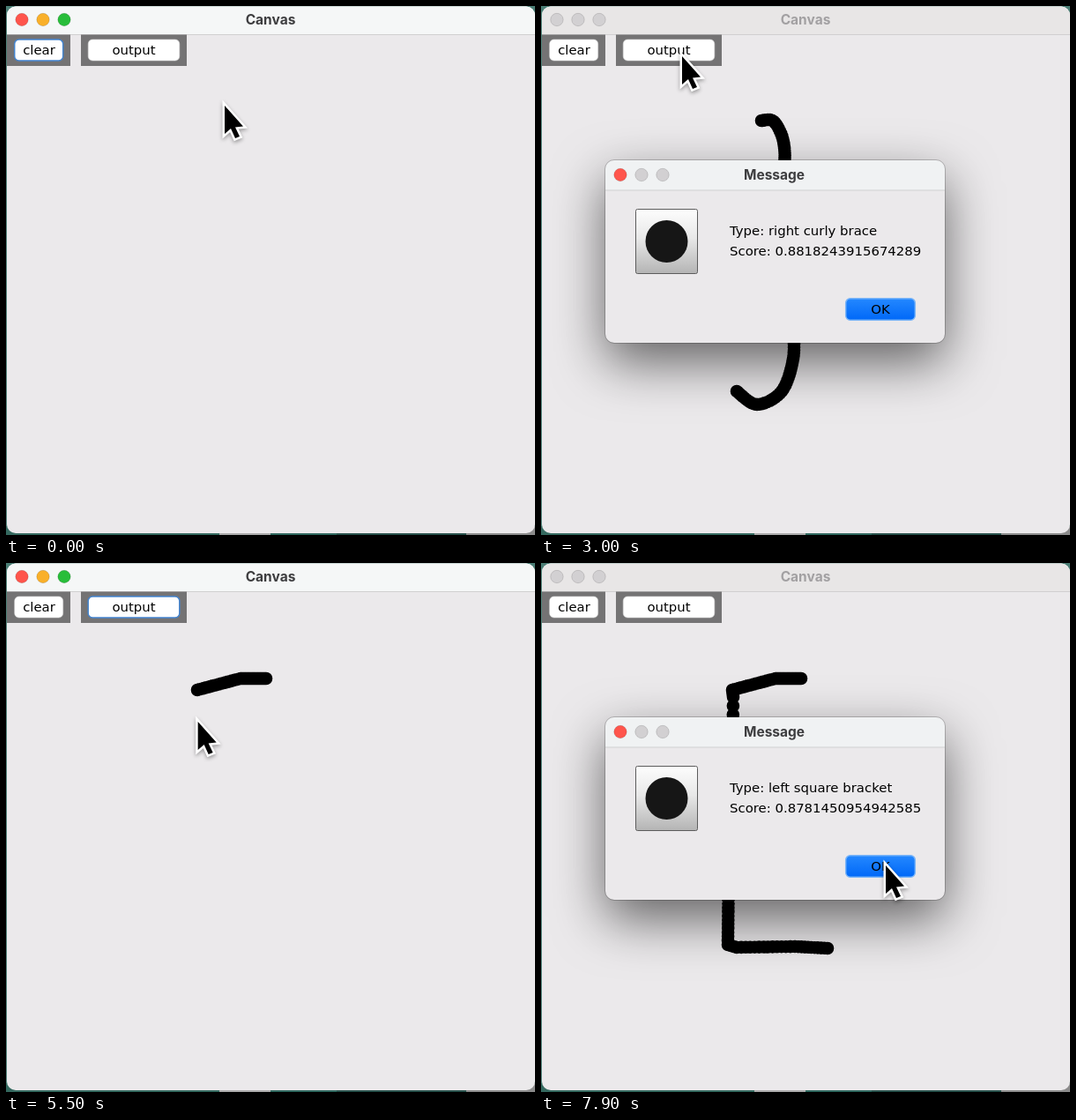
Write an HTML page that moves like this. It is 600 by 600 pixels and loops after 8 s.

```html
<!DOCTYPE html>
<html lang="en">
<head>
<meta charset="utf-8">
<title>Canvas</title>
<style>
  html, body { margin: 0; width: 100%; height: 100%; overflow: hidden; background: #4a7d74; }
  svg { display: block; width: 100vw; height: 100vh; }
  text { text-anchor: middle; font: 14.9px "DejaVu Sans", sans-serif; fill: #000; }
  .title { font: 700 15.5px Inter, sans-serif; fill: #3d3d3f; }
  .note { text-anchor: start; }
  .light { stroke: #0002; stroke-width: 1; }
  .off { fill: #d2d0d2; }
  .button { fill: #fff; stroke: #d5d5d5; stroke-width: .6; }
  .button.focus { stroke: #4384cf; stroke-width: 1.5; }
  .inactive .bar { fill: #e8e6e6; }
  .inactive .title { fill: #a2a0a2; }
  .inactive .light { fill: #d2d0d2; }
  #dialog > rect:first-child { filter: drop-shadow(0 22px 29px rgba(0, 0, 0, .58)); }
  #ink { fill: none; stroke: #000; stroke-width: 14.6; stroke-linecap: round; }
  #cursor { filter: drop-shadow(0 2px 2px rgba(0, 0, 0, .35)); }
</style>
</head>
<body>
<svg viewBox="0 0 600 600">
  <defs>
    <linearGradient id="tile" x2="0" y2="1">
      <stop stop-color="#fdfdfd"/><stop offset=".45" stop-color="#e8e8e8"/><stop offset="1" stop-color="#b4b4b4"/>
    </linearGradient>
    <linearGradient id="blue" x2="0" y2="1">
      <stop stop-color="#2488ff"/><stop offset="1" stop-color="#0068f8"/>
    </linearGradient>
    <clipPath id="frame"><rect x="1" y=".6" width="599" height="597.4" rx="10"/></clipPath>
  </defs>

  <rect y="590" width="242" height="10" fill="#34695f"/>
  <rect x="242" y="590" width="58" height="10" fill="#aaa"/>
  <rect x="300" y="590" width="75" height="10" fill="#2f675e"/>
  <rect x="375" y="590" width="147" height="10" fill="#27504a"/>
  <rect x="522" y="590" width="78" height="10" fill="#8b8b8b"/>

  <g id="main" clip-path="url(#frame)">
    <rect width="600" height="600" fill="#ebe9eb"/>
    <rect class="bar" width="600" height="32" fill="#f5f7f7"/>
    <rect y="32" width="600" height="1" fill="#d0cfd0"/>
    <circle class="light" cx="18" cy="15.5" r="7.2" fill="#ff554c"/>
    <circle class="light" cx="42" cy="15.5" r="7.2" fill="#f9b02a"/>
    <circle class="light" cx="66" cy="15.5" r="7.2" fill="#28bd3a"/>
    <text class="title" x="300" y="20.5">Canvas</text>
    <rect x="1" y="32.5" width="72" height="35.5" fill="#747374"/>
    <rect x="85" y="32.5" width="120" height="35.5" fill="#747374"/>
    <rect id="clear" class="button" x="9.7" y="38" width="55" height="24" rx="5"/>
    <rect id="output" class="button" x="93.2" y="38" width="103.6" height="24" rx="5"/>
    <text x="37.5" y="55">clear</text>
    <text x="145" y="55">output</text>
    <path id="ink"/>
  </g>

  <g id="dialog">
    <rect x="73" y="175" width="385" height="207" rx="10" fill="#ebe9eb"/>
    <path d="M73 209V185a10 10 0 0 1 10-10H448a10 10 0 0 1 10 10V209Z" fill="#f0f2f3"/>
    <rect x="73" y="208.5" width="385" height="1" fill="#d2d1d2"/>
    <rect x="72.5" y="174.5" width="386" height="208" rx="10.5" fill="none" stroke="#0003"/>
    <circle class="light" cx="90" cy="191.5" r="7.2" fill="#ff554c"/>
    <circle class="light off" cx="114" cy="191.5" r="7.2"/>
    <circle class="light off" cx="138" cy="191.5" r="7.2"/>
    <text class="title" x="264.5" y="196.5">Message</text>
    <rect x="107.5" y="230.5" width="70" height="73" rx="2" fill="url(#tile)" stroke="#5c5c5c"/>
    <circle cx="142.5" cy="267" r="24" fill="#161616"/>
    <text class="note" id="type" x="214" y="259.5"></text>
    <text class="note" id="score" x="214" y="282.5"></text>
    <rect x="345.7" y="331.7" width="78.6" height="24.6" rx="5" fill="url(#blue)" stroke="#7ab5f8" stroke-width="1.5"/>
    <text x="385" y="348.5">OK</text>
  </g>

  <g id="cursor">
    <path d="M0-2V30L7 24L12 35L17 33L12 22.5L21 21.5Z" stroke="#fff" stroke-width="5" paint-order="stroke"/>
  </g>
</svg>

<script>
const LOOP = 8000, STEP = 100, LAG = 100, EVENT = 10;
const el = id => document.getElementById(id);
const mix = (a, b, k) => a + (b - a) * k;

// Pen paths: time, x, y
const braceTop = [
  [300, 250, 130], [370, 264, 131], [460, 275, 154], [580, 275, 188], [740, 261, 234],
  [850, 259, 270], [940, 273, 292], [1000, 292, 302], [1180, 316, 304]
];
const braceTail = [
  [1280, 316, 304], [1390, 294, 320], [1520, 287, 360], [1640, 286, 400],
  [1770, 273, 437], [1870, 245, 452], [2000, 222, 437]
];
const bracket = [
  [5000, 295, 131], [5200, 266, 131], [5400, 217, 144], [5470, 218, 152],
  [5560, 217, 242], [5570, 216, 257], [5660, 213, 330], [5880, 212, 433],
  [5970, 222, 436], [6100, 288, 435], [6200, 325, 437]
];

// A leg moves the pointer from its start on; it rests at the end until the next leg
const at = (p, k) => {
  const i = p.findIndex(q => q[0] > k);
  return i < 0 ? p.length - 1 : i;
};

function curve(p) {
  return { start: p[0][0], pos(t) {
    const i = at(p, t), a = p[i - 1], b = p[i];
    if (t >= b[0]) return b.slice(1);
    const before = p[i - 2] || a, after = p[i + 1] || b, k = (t - a[0]) / (b[0] - a[0]);
    return [1, 2].map(n => {
      const m0 = (b[n] - before[n]) / 2, m1 = (after[n] - a[n]) / 2, d = b[n] - a[n];
      return a[n] + k * (m0 + k * (3 * d - 2 * m0 - m1 + k * (m0 + m1 - 2 * d)));
    });
  } };
}

function line(p) {
  return { start: p[0][0], pos(t) {
    const i = at(p, t), a = p[i - 1], b = p[i];
    const k = Math.min(1, (t - a[0]) / (b[0] - a[0]));
    return [1, 2].map(n => mix(a[n], b[n], k));
  } };
}

function move(start, end, x, y) {
  return { start, pos(t) {
    const from = pointer(start - 1);
    let k = Math.min(1, (t - start) / (end - start));
    k *= k * (3 - 2 * k);
    return [mix(from[0], x, k), mix(from[1], y, k)];
  } };
}

const toOutput = [160, 59], toOk = [391, 345], toClear = [40, 56];
const legs = [
  move(0, 200, 250, 130), curve(braceTop), curve(braceTail),
  move(2100, 2700, ...toOutput), move(3100, 3600, ...toOk), move(3800, 4150, ...toClear),
  move(4250, 4500, 280, 152), move(4500, 4700, 295, 131), line(bracket),
  move(6300, 6900, ...toOutput), move(7250, 7900, ...toOk)
];

function pointer(t) {
  if (t < 0) return [248, 115];
  return legs.filter(l => l.start <= t).pop().pos(t);
}

// Each stroke stays from pen down until it is cleared
const strokes = [
  { down: 300, up: 2000, clear: 4300 },
  { down: 5000, up: 6200, clear: LOOP }
];
const messages = [
  { open: 2900, close: 3800, type: "right curly brace", score: "0.8818243915674289" },
  { open: 7100, close: LOOP, type: "left square bracket", score: "0.8781450954942585" }
];

function inkPath(t) {
  const s = strokes.find(s => t >= s.down + LAG && t < s.clear);
  if (!s) return "";
  let d = "";
  for (let e = s.down; e <= Math.min(t - LAG, s.up); e += EVENT) {
    const [x, y] = pointer(e);
    d += `M${x.toFixed(1)} ${y.toFixed(1)}h.01`;
  }
  return d;
}

function draw(t) {
  const msg = messages.find(m => t >= m.open && t < m.close);
  el("ink").setAttribute("d", inkPath(t));
  el("cursor").setAttribute("transform", `translate(${pointer(t)})`);
  el("main").classList.toggle("inactive", !!msg);
  el("clear").classList.toggle("focus", t < messages[0].open);
  el("output").classList.toggle("focus", t >= messages[0].open && !msg);
  el("dialog").style.display = msg ? "" : "none";
  if (msg) {
    el("type").textContent = "Type: " + msg.type;
    el("score").textContent = "Score: " + msg.score;
  }
}

let last = -1;
function tick() {
  const t = Math.floor(performance.now() % LOOP / STEP) * STEP;
  if (t !== last) draw(last = t);
  requestAnimationFrame(tick);
}
tick();
</script>
</body>
</html>
```
